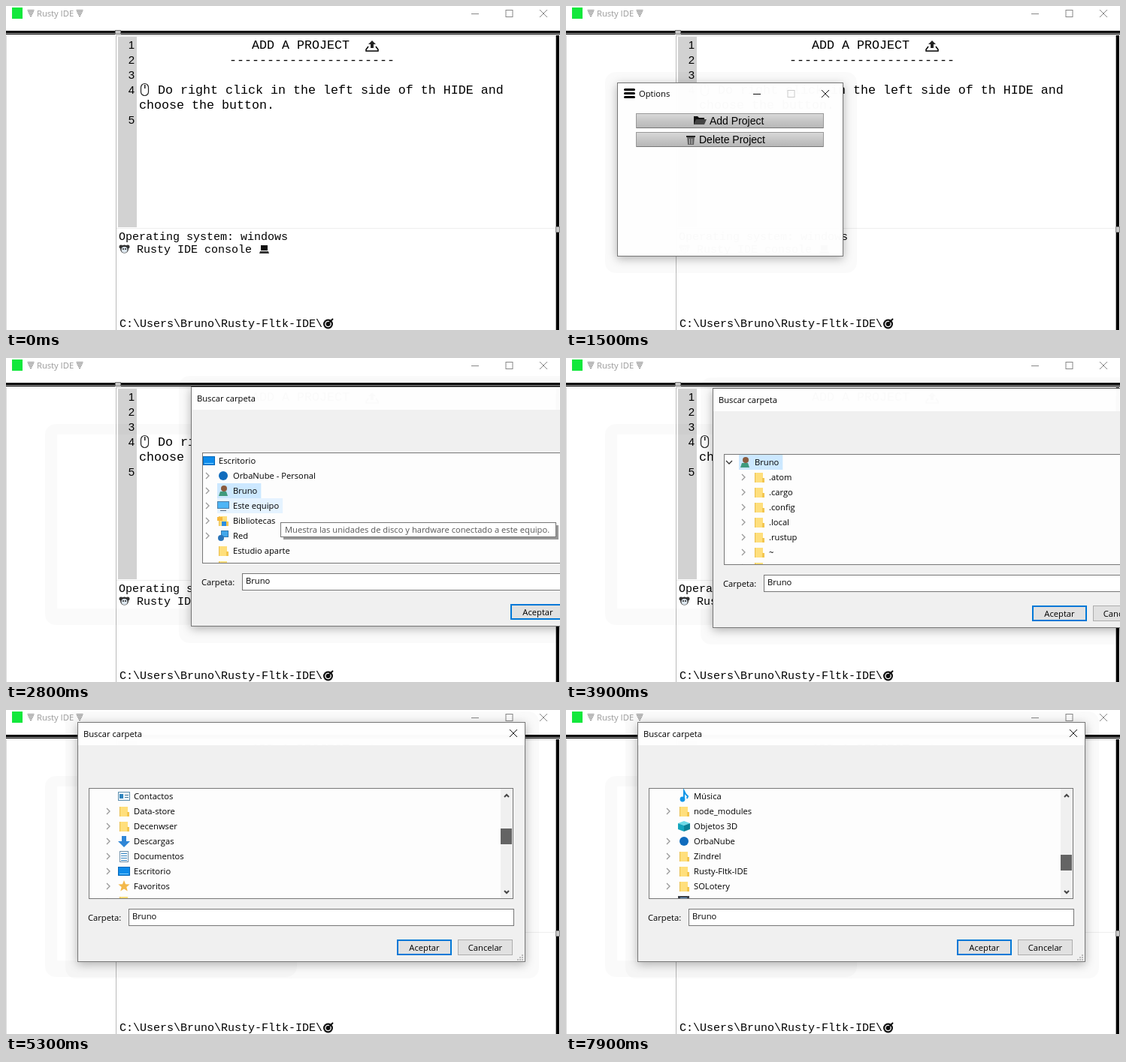
These frames come from a looping animation (737 by 432 pixels, 8 s). An HTML page with a canvas:

```html
<!DOCTYPE html>
<html lang="en">
<head>
<meta charset="utf-8">
<title>Rusty IDE</title>
<style>
html, body { margin: 0; width: 100%; height: 100%; overflow: hidden; background: #fff; }
canvas { display: block; }
</style>
</head>
<body>
<canvas id="stage" width="737" height="432"></canvas>
<script>
const c = document.getElementById('stage').getContext('2d');
const LOOP = 8000;
const UI = '11.2px "Open Sans", sans-serif';
const ARIAL = '14px "Liberation Sans", Arial, sans-serif';
const mono = size => `${size}px "Liberation Mono", monospace`;
const USER = 'Bruno';

// Tree rows: icon letter, '+' when expandable, label
const parse = s => s.split('|').map(r => ({ icon: r[0], open: r[1] === '+', label: r.slice(2) }));
const roots = parse(`e-Escritorio|n+OrbaNube - Personal|u+${USER}|p+Este equipo|b+Bibliotecas|r+Red|f-Estudio aparte|f-UTN`);
const home = parse(`u+${USER}|f+.atom|f+.cargo|f+.config|f+.local|f+.rustup|f+~|f+adlbuild|f+blockchain|f-Búsquedas|` +
  'c-Contactos|f+Data-store|f+Decenwser|d+Descargas|t+Documentos|e+Escritorio|s+Favoritos|f+hardhat-nft_201|' +
  'i+Imágenes|f+Juegos guardados|f+brunocarvenal|f+monthly_subscription_solana|m-Música|f+node_modules|' +
  'o-Objetos 3D|n+OrbaNube|f+Zindrel|f+Rusty-Fltk-IDE|f+SOLotery|v-Vídeos');

function box(x, y, w, h, fill, stroke) {
  if (fill) { c.fillStyle = fill; c.fillRect(x, y, w, h); }
  if (stroke) { c.strokeStyle = stroke; c.lineWidth = 1; c.strokeRect(x + .5, y + .5, w - 1, h - 1); }
}
function text(s, x, y, font = UI, color = '#000', align = 'left') {
  c.font = font; c.fillStyle = color; c.textAlign = align;
  c.fillText(s, x, y);
}
function line(points, color, width = 1) {
  c.beginPath();
  for (let i = 0; i < points.length; i += 2) c.lineTo(points[i], points[i + 1]);
  c.strokeStyle = color; c.lineWidth = width; c.stroke();
}
function shape(points, fill) {
  c.beginPath();
  for (let i = 0; i < points.length; i += 2) c.lineTo(points[i], points[i + 1]);
  c.fillStyle = fill; c.fill();
}
function disc(x, y, r, fill) {
  c.beginPath(); c.arc(x, y, r, 0, 7); c.fillStyle = fill; c.fill();
}
function at(x, y, draw) {
  c.save(); c.translate(x, y); draw(); c.restore();
}
function cross(x, y, color) {
  line([x - 5, y - 5, x + 5, y + 5], color); line([x - 5, y + 5, x + 5, y - 5], color);
}
function controls(x, y, step, color, maxColor = color) {
  line([x - 5, y + .5, x + 5, y + .5], color);
  box(x + step - 5, y - 5, 10, 10, null, maxColor);
  cross(x + 2 * step, y, color);
}
// Linear interpolation through [time, value] pairs
function track(t, keys) {
  if (t <= keys[0][0]) return keys[0][1];
  for (let i = 1; i < keys.length; i++) {
    const [a, u] = keys[i - 1], [b, v] = keys[i];
    if (t <= b) return u + (v - u) * (t - a) / (b - a);
  }
  return keys[keys.length - 1][1];
}

const icons = {
  f() { box(-6, -6, 11, 13, '#ffdf7c'); box(-6, -6, 1, 13, '#e9bd4a'); box(4, 1, 3, 6, '#f3c650'); },
  e() { box(-8, -6, 16, 12, '#0d8bea', '#0868b8'); box(-6, 3, 12, 1, '#7fd0ff'); },
  n() { disc(0, 0, 6, '#0f6cbd'); },
  u() { disc(1, -3, 4, '#8a5a3c'); shape([-6, 7, -4, 1, 4, 1, 6, 7], '#3f9a7d'); },
  p() { box(-8, -6, 16, 10, '#4db5f5', '#4a7fa8'); box(-4, 6, 8, 1, '#567'); },
  b() { icons.f(); box(-8, -5, 7, 5, '#f6b73c'); box(-2, 1, 6, 6, '#2c8fe0'); },
  r() { box(-3, -7, 10, 9, '#43a7ea', '#2f78b0'); disc(-3, 3, 4, '#2b74b8'); },
  c() { box(-8, -6, 16, 12, '#eef6fb', '#5d8fae'); box(-6, -3, 5, 6, '#2d83bd'); box(1, -2, 5, 1, '#479'); box(1, 1, 5, 1, '#479'); },
  d() { shape([-3, -7, 3, -7, 3, 0, 8, 0, 0, 8, -8, 0, -3, 0], '#2f86d6'); },
  t() { box(-6, -7, 12, 15, '#fff', '#6f8fa8'); for (let y = -4; y < 6; y += 3) box(-4, y, 8, 1, '#2b7fc0'); },
  s() {
    const p = [];
    for (let i = 0; i < 10; i++) {
      const a = i * Math.PI / 5 - Math.PI / 2, r = i % 2 ? 3.5 : 8;
      p.push(r * Math.cos(a), r * Math.sin(a));
    }
    shape(p, '#f3b84a');
  },
  m() { disc(-2, 4, 3.4, '#1296e8'); line([0, 4, 0, -7, 2, -3, 5, 0, 4, 3], '#1296e8', 2); },
  o() { shape([-8, -4, 0, -7, 8, -4, 0, -1], '#6ddbe8'); shape([-8, -4, 0, -1, 0, 7, -8, 4], '#14a5bd'); shape([8, -4, 0, -1, 0, 7, 8, 4], '#0b8198'); },
  i() { box(-8, -6, 16, 12, '#bfe4fa', '#5d8fae'); shape([-7, 5, -1, -2, 6, 5], '#3a8f6a'); },
  v() { box(-8, -7, 15, 14, '#3b4048'); box(-5, -5, 9, 10, '#6a9fd0'); }
};

function chevron(x, y, down) {
  line(down ? [x - 4, y - 2, x, y + 2, x + 4, y - 2] : [x - 2, y - 4, x + 2, y, x - 2, y + 4], down ? '#333' : '#999', 1.3);
}
function row(item, level, y, back, expanded) {
  const x = 37 + 19 * level;
  if (back) {
    c.font = UI;
    box(x - 21, y - 10, c.measureText(item.label).width + 26, 20, back);
  }
  if (item.open) chevron(x - 34, y, expanded);
  at(x - 13, y, icons[item.icon]);
  text(item.label, x, y + 4);
}

function tornado(x) {
  [9, 8, 6, 4, 2].forEach((w, i) => box(x - w / 2, 5 + i * 2, w, 1.3, '#999'));
}
function desktop() {
  box(0, 0, 737, 432, '#fff');
  box(8, 2, 14, 15, '#12e83c');
  tornado(33); text('Rusty IDE', 41, 14, UI, '#999'); tornado(98);
  controls(624, 10, 45.5, '#888');

  box(0, 33, 737, 5, '#000'); box(0, 36, 737, 1, '#aaa');
  box(145, 32, 8, 6, '#c8c8c8', '#777');
  box(0, 40, 1, 392, '#ddd'); box(146, 39, 1, 393, '#bbb');
  box(147, 39, 584, 1, '#ccc'); box(147, 296, 584, 1, '#eee');
  box(731, 39, 5, 393, '#000'); box(731, 39, 1, 393, '#aaa');
  box(731, 294, 6, 8, '#c8c8c8', '#888');

  box(149, 41, 25, 254, '#d2d2d2');
  [57, 77, 97, 117, 157].forEach((y, i) => text(i + 1, 171, y, '15px "Liberation Sans", Arial, sans-serif', '#000', 'right'));
  const code = mono(16.67);
  text('ADD A PROJECT', 327, 57, code);
  text('-'.repeat(22), 297, 77, code);
  text('Do right click in the left side of th HIDE and', 202, 117, code);
  text('choose the button.', 177, 137, code);
  // Upload tray
  line([482, 54, 479, 58, 479, 60, 495, 60, 495, 58, 492, 54], '#000', 1.5);
  shape([487, 46, 492, 51, 489, 51, 489, 56, 485, 56, 485, 51, 482, 51], '#222');
  // Mouse
  c.beginPath(); c.roundRect(179.5, 103.5, 10, 16, 5);
  c.strokeStyle = '#222'; c.lineWidth = 1.2; c.stroke();
  box(184, 105, 1.5, 5, '#222');

  const shell = mono(15);
  text('Operating system: windows', 150, 312, shell);
  text('Rusty IDE console', 174, 329, shell);
  text(`C:\\Users\\${USER}\\Rusty-Fltk-IDE\\`, 151, 428, shell);
  // Small face, laptop and target
  disc(153, 321, 2.5, '#333'); disc(162, 321, 2.5, '#333'); disc(157.5, 324, 5.5, '#333'); disc(157.5, 325, 4, '#dce6ee');
  disc(156, 324, 1, '#222'); disc(159, 324, 1, '#222');
  box(339, 319, 9, 7, '#111'); shape([338, 327, 349, 327, 350, 330, 337, 330], '#333');
  disc(428.5, 424, 6.5, '#111'); disc(428.5, 424, 4.3, '#fff'); disc(428.5, 424, 3, '#111');
  line([428, 424, 435, 417], '#111', 2);
}

// Pale rim left around a window
function halo(x, y, w, h) {
  c.beginPath();
  c.roundRect(x - 16, y - 14, w + 34, h + 36, 14); c.rect(x, y, w, h);
  c.fillStyle = 'rgba(0,0,0,.02)'; c.fill('evenodd');
}
// Opens or closes a w by h window: p runs from 0 to 1
function show(x, y, w, h, p, draw) {
  if (p <= 0) return;
  const s = .9 + .1 * p;
  c.save();
  c.translate(x + w / 2, y + h / 2); c.scale(s, s); c.translate(-w / 2, -h / 2);
  c.globalAlpha = p;
  halo(0, 0, w, h);
  c.save();
  c.shadowColor = 'rgba(0,0,0,.3)'; c.shadowBlur = 12; c.shadowOffsetY = 3;
  c.globalAlpha = p * .98;
  box(0, 0, w, h, '#fff');
  c.restore();
  draw();
  box(0, 0, w, h, null, '#777');
  c.restore();
}

function button(y, label, x, icon) {
  const g = c.createLinearGradient(0, y, 0, y + 20);
  g.addColorStop(0, '#dadada'); g.addColorStop(.5, '#c6c6c6'); g.addColorStop(1, '#b6b6b6');
  box(25, y, 250, 20, g, '#999');
  box(26, y + 19, 248, 1, '#777');
  text(label, x, y + 15, ARIAL);
  icon();
}
function options() {
  for (let y = 8; y < 20; y += 5) { c.beginPath(); c.roundRect(9, y, 15, 3, 1.5); c.fillStyle = '#000'; c.fill(); }
  text('Options', 29, 19);
  controls(186, 15, 45.5, '#111', '#ccc');
  button(41, 'Add Project', 123, () => {
    shape([102, 45, 107, 45, 109, 47, 116, 47, 116, 56, 102, 56], '#111');
    shape([105, 49, 119, 49, 116, 56, 102, 56], '#444');
  });
  button(66, 'Delete Project', 109, () => {
    shape([93, 73, 103, 73, 102, 83, 94, 83], '#666');
    box(92, 71, 12, 2, '#222'); box(96, 75, 1, 7, '#bbb'); box(99, 75, 1, 7, '#bbb');
  });
}

function tree(t) {
  c.save();
  c.beginPath(); c.rect(16, 89, 564, 146); c.clip();
  box(16, 89, 564, 146, '#fdfdfd');
  const pos = track(t, [[4800, 0], [5300, 10], [5700, 15], [6200, 18.6], [6300, 18.6], [6500, 19.7], [7400, 19.7], [7700, 21.7]]);
  const first = Math.round(pos), blue = '#cce8ff';
  for (let i = 0; i < 8; i++) {
    const y = 99 + 20 * i;
    if (t < 3400) {
      const inside = t >= 3300 && i > 2;
      const back = i === 2 ? blue : i === 3 && t >= 2800 && t < 3000 ? '#e5f3ff' : null;
      if (inside) row(home[i - 2], 2, y);
      else row(roots[i], i ? 1 : 0, y, back, i === 2 && t >= 3300);
    } else if (home[first + i]) {
      const top = first + i === 0;
      row(home[first + i], top ? 1 : 2, y, top && blue, top);
    }
  }
  box(563, 89, 17, 146, '#f0f0f0');
  line([568, 100, 571, 97, 574, 100], '#444', 2);
  line([568, 225, 571, 228, 574, 225], '#444', 2);
  const held = t >= 4700 && t < 6500 || t >= 7500;
  box(563, Math.round(112 + 3 * pos), 15, 21, held ? '#646464' : t >= 6500 ? '#bcbcbc' : '#cdcdcd');
  c.restore();
  box(15, 88, 565, 148, null, '#777');
}
function folderDialog(t) {
  box(0, 31, 596, 289, '#f0f0f0');
  text('Buscar carpeta', 8, 20);
  cross(580, 15, '#111');
  tree(t);
  text('Carpeta:', 14, 265);
  box(68, 249, 513, 23, '#fff', '#777');
  text(USER, 73, 263);
  box(425, 290, 73, 21, '#e1e1e1', '#0078d7'); box(426, 291, 71, 19, null, '#0078d7');
  text('Aceptar', 461.5, 305, UI, '#000', 'center');
  box(506, 290, 73, 21, '#e1e1e1', '#adadad');
  text('Cancelar', 542.5, 305, UI, '#000', 'center');
  for (let i = 0; i < 3; i++) for (let j = 0; j <= i; j++) box(591 - 3 * j, 310 + 3 * i, 2, 2, '#bbb');
}
function tooltip(alpha) {
  c.save();
  c.globalAlpha = alpha;
  box(369, 223, 366, 19, 'rgba(0,0,0,.4)');
  box(365, 219, 367, 20, '#fff', '#767676');
  text('Muestra las unidades de disco y hardware conectado a este equipo.', 371, 233, UI, '#575757');
  c.restore();
}

function render(now) {
  const t = Math.floor(now % LOOP / 100) * 100;
  desktop();
  if (t >= 2300) halo(68, 102, 301, 232);
  show(68, 102, 301, 232, track(t, [[1100, 0], [1500, 1], [2000, 1], [2300, 0]]), options);
  const x = Math.round(track(t, [[3800, 246], [3900, 195], [4000, 160], [4100, 130], [4200, 108], [4300, 95]]));
  const y = Math.round(track(t, [[3800, 38], [3900, 40], [4300, 16]]));
  show(x, y, 596, 320, track(t, [[2200, 0], [2600, 1]]), () => folderDialog(t));
  if (t === 2800 || t === 2900) tooltip(t === 2800 ? 1 : .5);
  requestAnimationFrame(() => render(performance.now() - start));
}
const start = performance.now();
render(0);
</script>
</body>
</html>
```
